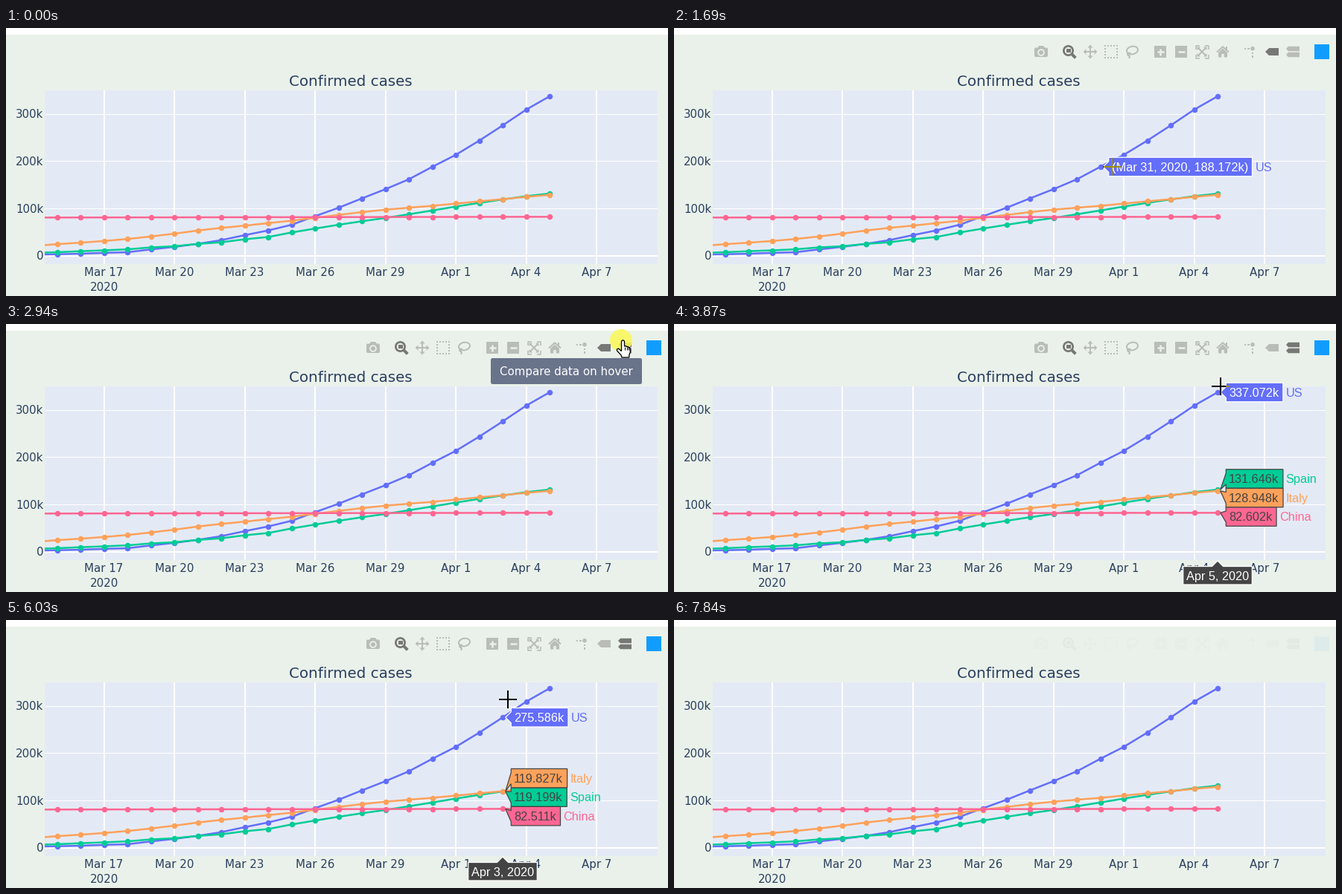
Recreate the animation shown at these times as a matplotlib script. Size 889x361 px, loop 8.16 s.

```python
import numpy as np
import matplotlib.pyplot as plt
from matplotlib.animation import FuncAnimation
from matplotlib.colors import to_rgb
from matplotlib.lines import Line2D
from matplotlib.patches import Circle, Ellipse, FancyBboxPatch, Polygon, Rectangle

W, H, DPI = 889, 361, 128
LOOP, STEP = 8160, 20
PT = 72 / DPI
BG, PLOT, INK, DARK = "#eaf1ea", "#e4eaf5", "#2a3f5f", "#444444"
LEFT, RIGHT, TOP, BOTTOM = 52, 875, 84, 318

# thousands of cases, one value per day from Mar 14 to Apr 5
SERIES = {
    "US": ("#636efa", [2.727, 3.499, 4.632, 6.421, 7.783, 13.677, 19.1, 25.489,
                       33.276, 43.847, 53.74, 65.778, 83.836, 101.657, 121.478,
                       140.886, 161.807, 188.172, 213.372, 243.453, 275.586,
                       308.85, 337.072]),
    "Spain": ("#00cc96", [6.391, 7.798, 9.942, 11.748, 13.91, 17.963, 20.41,
                          25.374, 28.768, 35.136, 39.885, 49.515, 57.786,
                          65.719, 73.235, 80.11, 87.956, 95.923, 104.118,
                          112.065, 119.199, 126.168, 131.646]),
    "Italy": ("#ffa15a", [21.157, 24.747, 27.98, 31.506, 35.713, 41.035, 47.021,
                          53.578, 59.138, 63.927, 69.176, 74.386, 80.589,
                          86.498, 92.472, 97.689, 101.739, 105.792, 110.574,
                          115.242, 119.827, 124.632, 128.948]),
    "China": ("#ff6692", list(np.linspace(80.977, 82.198, 17).round(3))
              + [82.279, 82.361, 82.432, 82.511, 82.543, 82.602]),
}
DAYS = 23
DAY_X = 730 - 31.5 * np.arange(DAYS - 1, -1, -1)

# pointer path: start time, step length, (step, x, y) points
MOVES = [
    (1300, 77, [(0, 572, 348), (5, 588, 187), (10, 738, 114)]),
    (2170, 74, [(0, 744, 99), (5, 826, 52), (7, 826, 22)]),
    (3310, 78, [(0, 824, 40), (7, 734, 84), (10, 722, 87)]),
    (4170, 80, [(0, 722, 89)]),
    (4480, 80, [(0, 724, 90)]),
    (5110, 76, [(0, 718, 90), (3, 702, 92)]),
    (5720, 80, [(0, 699, 93)]),
    (5870, 78, [(0, 692, 97), (2, 674, 107), (5, 670, 112)]),
    (6660, 80, [(0, 674, 111), (4, 694, 107)]),
    (7370, 78, [(0, 694, 140), (3, 690, 342), (6, 690, 420)]),
]
CLICK, SWITCH = 2940, 3090


def case_y(v):
    return 307 - 0.6379 * v


def day_name(d):
    return f"Mar {d + 14}" if d < 18 else f"Apr {d - 17}"


fig = plt.figure(figsize=(W / DPI, H / DPI), dpi=DPI, facecolor="white")
ax = fig.add_axes([0, 0, 1, 1])
ax.set_xlim(0, W)
ax.set_ylim(H, 0)
ax.axis("off")


def put(artist):
    if isinstance(artist, Line2D):
        ax.add_line(artist)
    else:
        ax.add_patch(artist)
    return artist


def rect(x0, y0, x1, y1, color, z=1):
    return put(Rectangle((x0, y0), x1 - x0, y1 - y0, fc=color, lw=0, zorder=z))


def poly(pts, color, z=4, edge="none", lw=0):
    return put(Polygon(pts, closed=True, fc=color, ec=edge, lw=lw * PT, zorder=z))


def stroke(pts, w, color, z=4, **kw):
    xs, ys = zip(*pts)
    return put(Line2D(xs, ys, lw=w * PT, color=color, zorder=z,
                      solid_capstyle="butt", **kw))


def disc(x, y, r, color, z=4, **kw):
    return put(Circle((x, y), r, fc=color, lw=0, zorder=z, **kw))


def write(x, y, s, px=15, color=INK, ha="center", font="DejaVu Sans", z=3):
    return ax.text(x, y, s, size=px * PT, color=color, ha=ha, va="baseline",
                   family=font, zorder=z)


# ---- chart ----
def draw_chart():
    rect(0, 9, W, H, BG, 0)
    area = rect(LEFT, TOP, RIGHT, BOTTOM, PLOT, 0.5)
    for d in range(3, 25, 3):
        x = 730 + 31.5 * (d - 22)
        stroke([(x, TOP), (x, BOTTOM)], 2, "white", 1)
        write(x, 334, day_name(d))
    write(131.5, 354, "2020")
    for v in (0, 100, 200, 300):
        y = case_y(v)
        stroke([(LEFT, y), (RIGHT, y)], 1 if v else 2, "white", 1)
        write(50.5, y + 5.3, f"{v}k" if v else "0", ha="right")
    write(463, 78, "Confirmed cases", 19.9)
    for color, vals in SERIES.values():
        line = Line2D(DAY_X, [case_y(v) for v in vals], color=color, lw=2.5 * PT,
                      marker="o", ms=7.5 * PT, mew=0, zorder=2)
        put(line).set_clip_path(area)


# ---- toolbar ----
ICON_X = dict(camera=493, zoom=531, pan=559, box=587, lasso=615, plus=653,
              minus=681, auto=709, home=737, spike=773, closest=803,
              compare=831, mark=870)
CY = 32


def tag(x, y, w, h, tip):
    return poly([(x, y), (x + tip, y - h / 2), (x + w, y - h / 2),
                 (x + w, y + h / 2), (x + tip, y + h / 2)], BG)


def draw_icons():
    icons = {}
    c = ICON_X["camera"]
    icons["camera"] = [
        put(FancyBboxPatch((c - 8, 27.5), 16, 10.5, lw=0, zorder=4,
                           boxstyle="round,pad=1,rounding_size=2")),
        poly([(c - 5, 27), (c - 3, 24), (c + 3, 24), (c + 5, 27)], BG)]
    disc(c, 33, 4.8, BG)
    icons["camera"].append(disc(c, 33, 3, BG))

    c = ICON_X["zoom"]
    icons["zoom"] = [disc(c - 1.5, 30.5, 7.5, BG),
                     stroke([(c + 3, 35), (c + 8.3, 40.3)], 4, BG)]
    disc(c - 1.5, 30.5, 4.8, BG)
    icons["zoom"].append(rect(c - 4.5, 28, c + 1.5, 33, BG, 4))

    c = ICON_X["pan"]
    icons["pan"] = [stroke([(c - 7, CY), (c + 7, CY)], 2, BG),
                    stroke([(c, CY - 7), (c, CY + 7)], 2, BG)]
    for dx, dy in ((1, 0), (-1, 0), (0, 1), (0, -1)):
        icons["pan"].append(poly([(c + 9.5 * dx, CY + 9.5 * dy),
                                  (c + 5.5 * dx + 3.6 * dy, CY + 5.5 * dy + 3.6 * dx),
                                  (c + 5.5 * dx - 3.6 * dy, CY + 5.5 * dy - 3.6 * dx)], BG))

    c = ICON_X["box"]
    icons["box"] = []
    for k in np.linspace(-8, 8, 5):
        spots = [(k, -8), (k, 8)] + ([(-8, k), (8, k)] if abs(k) < 8 else [])
        icons["box"] += [rect(c + a - 1.2, CY + b - 1.2, c + a + 1.2, CY + b + 1.2, BG, 4)
                         for a, b in spots]

    c = ICON_X["lasso"]
    loop = np.linspace(0, 2 * np.pi, 40)
    icons["lasso"] = [
        stroke([(c + 0.5 + 7.5 * np.cos(a), 30 + 5.3 * np.sin(a) - 0.8 * np.cos(a))
                for a in loop], 2, BG),
        stroke([(c - 5, 33), (c - 6, 36), (c - 3, 38), (c - 4, 41)], 2, BG),
        put(Ellipse((c - 4, 34.5), 5, 4, lw=0, zorder=4))]

    for name in ("plus", "minus"):
        c = ICON_X[name]
        icons[name] = [rect(c - 8, 24, c + 8, 40, BG, 4)]
        stroke([(c - 4.5, CY), (c + 4.5, CY)], 2.5, BG)
        if name == "plus":
            stroke([(c, CY - 4.5), (c, CY + 4.5)], 2.5, BG)

    c = ICON_X["auto"]
    icons["auto"] = []
    for a in (-1, 1):
        icons["auto"].append(stroke([(c - 5 * a, CY - 5), (c + 5 * a, CY + 5)], 2, BG))
        for b in (-1, 1):
            icons["auto"] += [
                stroke([(c + 3.5 * a, CY + 8.5 * b), (c + 8.5 * a, CY + 8.5 * b),
                        (c + 8.5 * a, CY + 3.5 * b)], 1.6, BG),
                poly([(c + 6.5 * a, CY + 6.5 * b), (c + 2 * a, CY + 6.5 * b),
                      (c + 6.5 * a, CY + 2 * b)], BG)]

    c = ICON_X["home"]
    icons["home"] = [
        poly([(c - 6, 33), (c, 27.5), (c + 6, 33), (c + 6, 39.5), (c + 1.7, 39.5),
              (c + 1.7, 35), (c - 1.7, 35), (c - 1.7, 39.5), (c - 6, 39.5)], BG),
        stroke([(c - 8, 32.5), (c, 25.2), (c + 8, 32.5)], 2, BG),
        rect(c + 4, 25, c + 6.3, 30, BG, 4)]

    c = ICON_X["spike"]
    icons["spike"] = [rect(c - 7.5, 26.5, c - 5, 29, BG, 4),
                      rect(c - 3, 26.5, c - 0.5, 29, BG, 4),
                      disc(c + 4, 27.7, 2.8, BG),
                      rect(c + 2.8, 32.5, c + 5.2, 35, BG, 4),
                      rect(c + 2.8, 37, c + 5.2, 39.5, BG, 4)]

    icons["closest"] = [tag(794, CY, 18, 10, 5)]
    icons["compare"] = [tag(822, 28, 18, 6.5, 3), tag(822, 36, 18, 6.5, 3)]
    icons["mark"] = [rect(860, 22, 880, 42, BG, 4)]
    return icons


def mix(color, a):
    return tuple(np.array(to_rgb(BG)) * (1 - a) + np.array(to_rgb(color)) * a)


# ---- hover labels ----
ARROW, PAD, BOX_H = 7.5, 3.75, 25.5
boxes = []


def label_text(x, y, s, color, ha="left"):
    return write(x, y + 5.8, s, 16.25, color, ha, "Liberation Sans", 6)


def hover_label(name, d, s, cy=None):
    color, vals = SERIES[name]
    y = case_y(vals[d])
    cy = y if cy is None else cy
    ink = "white" if name == "US" else DARK
    text = label_text(0, cy, s, ink)
    w = text.get_window_extent().width + 2 * PAD + 2
    side = 1 if DAY_X[d] + w + 40 < W else -1
    tip = DAY_X[d] + PAD * side
    near = tip + ARROW * side
    far = near + w * side
    text.set_x(min(near, far) + PAD)
    h = BOX_H / 2
    box = poly([(tip, y), (near, cy + ARROW), (near, cy + h), (far, cy + h),
                (far, cy - h), (near, cy - h), (near, cy - ARROW)],
               color, 5, ink, 1.25)
    boxes.append((box, color))
    return [box, text, label_text(far + PAD * side, cy, name, color,
                                  "left" if side > 0 else "right")]


def date_label(d):
    x, top = DAY_X[d], 326.5
    text = label_text(x, top + 12.2, f"{day_name(d)}, 2020", "white", "center")
    half = text.get_window_extent().width / 2 + PAD + 0.5
    box = poly([(x, 319), (x + ARROW, top), (x + half, top), (x + half, 351),
                (x - half, 351), (x - half, top), (x - ARROW, top)],
               DARK, 5, "white", 1.25)
    return [box, text]


def closest_label(x, y):
    best = min((np.hypot(DAY_X[d] - x, case_y(v[d]) - y), name, d)
               for name, (_, v) in SERIES.items() for d in range(1, DAYS))
    if best[0] > 25:
        return []
    _, name, d = best
    return hover_label(name, d, f"({day_name(d)}, 2020, {SERIES[name][1][d]:g}k)")


def compare_labels(x):
    d = int(np.argmin(abs(DAY_X - x)))
    if abs(DAY_X[d] - x) > 25:
        return []
    value = {n: v[d] for n, (_, v) in SERIES.items()}
    low = sorted(("Spain", "Italy", "China"), key=lambda n: -value[n])
    mid = np.mean([case_y(value[n]) for n in low])
    spots = {n: mid + BOX_H * (k - 1) for k, n in enumerate(low)}
    made = date_label(d)
    for n in SERIES:
        made += hover_label(n, d, f"{value[n]:g}k", spots.get(n))
    return made


# ---- pointer ----
HAND = [(-2, 1.5), (-1, 0), (1, 0), (2, 1.5), (2, 8), (4, 7.5), (5.2, 8.8),
        (6.6, 8.3), (7.8, 9.7), (9, 9.6), (9.8, 11), (9.8, 16), (8.3, 20),
        (8.3, 23), (-1.5, 23), (-2.5, 20), (-8, 14), (-8, 12), (-6, 11), (-2, 14.5)]
POINTER = [(0, 0), (0, 17), (4, 13.3), (6.5, 19), (9, 18), (6.5, 12.3), (12, 12)]


def cross(x, y):
    made = []
    bars = [[(x - 12, y), (x + 12, y)], [(x, y - 12), (x, y + 12)]]
    for bar in bars:
        made.append(stroke(bar, 2, "black", 8))
        for box, color in boxes:
            part = stroke(bar, 2, tuple(1 - np.array(to_rgb(color))), 9)
            part.set_clip_path(box)
            made.append(part)
    return made


def hand(x, y):
    made = [poly([(x + 2.5 + a, y + b) for a, b in HAND], "white", 8, "black", 1.3)]
    for a in (2, 5.2, 7.8):
        made.append(stroke([(x + 2.5 + a, y + 9), (x + 2.5 + a, y + 13)], 1, "black", 9))
    return made


def tooltip():
    box = put(FancyBboxPatch((653, 48), 199, 31, fc="#69738a", lw=0, zorder=5,
                             boxstyle="round,pad=2,rounding_size=2.5"))
    return [box, write(752.5, 69, "Compare data on hover", color="white", z=6)]


def pose(t):
    """Pointer place and the start of the current step, or None before entry."""
    past = [m for m in MOVES if m[0] <= t]
    if not past:
        return None, t
    t0, dt, pts = past[-1]
    idx, xs, ys = zip(*pts)
    i = min((t - t0) // dt, idx[-1])
    return (np.interp(i, idx, xs), np.interp(i, idx, ys)), t0 + i * dt


draw_chart()
icons = draw_icons()
live = []


def update(n):
    while live:
        live.pop().remove()
    boxes.clear()
    t = n * STEP + STEP // 2
    spot, q = pose(t)
    comparing = t >= SWITCH
    over = None
    if spot and spot[1] < H:
        x, y = spot
        if TOP - 1 <= y <= BOTTOM and x < RIGHT:
            live.extend(compare_labels(x) if comparing else closest_label(x, y))
            live.extend(cross(x, y))
        elif 18 <= y < 46:
            over = min(ICON_X, key=lambda k: abs(ICON_X[k] - x))
            live.extend(hand(x, y))
        else:
            live.append(poly([(x + a, y + b) for a, b in POINTER],
                             "white", 8, "black", 1.2))
    if over == "compare":
        live.extend(tooltip())
    if CLICK <= t < SWITCH:
        live.append(disc(826, 22, 15, "#fbf85a", 7, alpha=0.88))

    shown = np.interp(q, [1300, 1600, 7520, 7838], [0, 1, 1, 0.06])
    active = {"zoom", "compare" if comparing else "closest", over}
    for name, parts in icons.items():
        if name == "mark":
            color = mix("#119dff", shown)
        else:
            color = mix(DARK, shown * (0.7 if name in active else 0.3))
        for part in parts:
            part.set_color(color)
    return live


anim = FuncAnimation(fig, update, frames=LOOP // STEP, interval=STEP,
                     init_func=lambda: update(0), repeat=True, repeat_delay=0,
                     blit=False, cache_frame_data=False)
plt.show()
```
